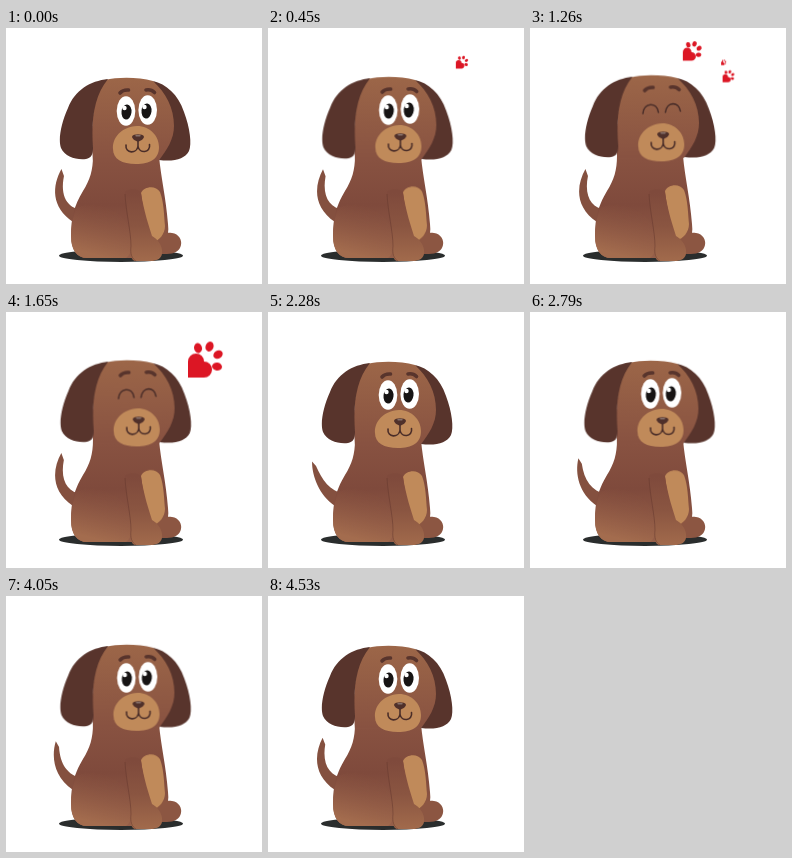
Recreate the animation shown at these times as an HTML page. Size 256 px wide and 256 px high, loop 4560 ms.

```html
<!DOCTYPE html>
<html lang="en">
<head>
<meta charset="utf-8">
<title>Happy dog</title>
<style>
  html, body { margin: 0; width: 100%; height: 100%; overflow: hidden; background: #fff; }
  svg { display: block; width: 100vw; height: 100vh; }

  :root { --loop: 4560ms; --sine: cubic-bezier(.37, 0, .63, 1); }

  .ear { fill: #58342c; }
  .tan { fill: #c08a5a; }
  .line { fill: none; stroke: #4a2d28; stroke-width: 1.6; stroke-linecap: round; }
  .brow { fill: none; stroke: #58342c; stroke-width: 3.6; stroke-linecap: round; }

  /* eleven full wags per loop */
  .tail { animation: wag calc(var(--loop) / 22) var(--sine) -406ms infinite alternate; }
  @keyframes wag {
    from { d: path("M55.5 141 C46 158 45 179 67 194 L76 182 C61 180 54 168 58 148 Z"); }
    to   { d: path("M44 149.5 C44 164 51 183 67 194 L76 182 C62 179 54 168 48 154 Z"); }
  }

  /* two breaths per loop */
  .head, .chest { animation: nod calc(var(--loop) / 4) var(--sine) infinite alternate; }
  .head { transform-origin: 120px 110px; }
  .chest { animation-name: breathe; }
  @keyframes nod { to { transform: translate(1.2px, -2.6px) rotate(-.7deg); } }
  @keyframes breathe { to { transform: translateY(-2px); } }

  .open { animation: open var(--loop) step-end infinite; }
  .shut { opacity: 0; animation: shut var(--loop) step-end infinite; }
  @keyframes open { 0%, 43% { opacity: 1; } 27% { opacity: 0; } }
  @keyframes shut { 0%, 43% { opacity: 0; } 27% { opacity: 1; } }

  .love { fill: #dc1624; transform: scale(0); animation: pop var(--loop) infinite; }
  @keyframes pop {
    0% { transform: scale(0); animation-timing-function: cubic-bezier(.61, 1, .88, 1); }
    11.2% { transform: scale(1); animation-timing-function: cubic-bezier(.12, 0, .39, 0); }
    22.4%, 100% { transform: scale(0); }
  }
</style>
</head>
<body>
<svg viewBox="0 0 256 256">
  <defs>
    <linearGradient id="fur" gradientUnits="userSpaceOnUse" x1="0" y1="50" x2="0" y2="231">
      <stop offset="0" stop-color="#9c6648"/>
      <stop offset=".45" stop-color="#885241"/>
      <stop offset=".7" stop-color="#7f4a3c"/>
      <stop offset="1" stop-color="#96604a"/>
    </linearGradient>
    <linearGradient id="haunch" gradientUnits="userSpaceOnUse" x1="108" y1="172" x2="94" y2="228">
      <stop offset="0" stop-color="#7f4a3c" stop-opacity="0"/>
      <stop offset="1" stop-color="#a36c4e"/>
    </linearGradient>
    <linearGradient id="leg" gradientUnits="userSpaceOnUse" x1="0" y1="165" x2="0" y2="231">
      <stop offset="0" stop-color="#7f4a3c"/>
      <stop offset=".5" stop-color="#8a5541"/>
      <stop offset="1" stop-color="#a0694b"/>
    </linearGradient>
    <g id="paw">
      <path d="M-16 17 V1 A8 8 0 0 1 0 1 A8 8 0 0 1 0 17 Z"/>
      <ellipse cx="-6" cy="-12.5" rx="4" ry="5" transform="rotate(-12 -6 -12.5)"/>
      <ellipse cx="5.5" cy="-14" rx="4" ry="5" transform="rotate(20 5.5 -14)"/>
      <ellipse cx="14" cy="-6" rx="4" ry="5" transform="rotate(55 14 -6)"/>
      <ellipse cx="13" cy="6" rx="4" ry="5" transform="rotate(98 13 6)"/>
    </g>
    <g id="pupil">
      <ellipse rx="5" ry="7.5" fill="#171414" transform="rotate(6)"/>
      <circle cx="-2" cy="-4" r="2.2" fill="#fff"/>
    </g>
  </defs>

  <ellipse cx="115" cy="227.700" rx="62" ry="6.200" fill="#2a2d2d"/>
  <path class="tail" fill="#84503f" d="M55.5 141 C46 158 45 179 67 194 L76 182 C61 180 54 168 58 148 Z"/>

  <path fill="url(#fur)" d="M87 98 V128 C87 142 84 152 77 163 C68 178 65 190 65 208 C65 222 71 230 81 230 H148 C157 222 164 210 162 196 C160 170 155 150 153 128 V98 Z"/>
  <path fill="#8c5642" d="M147 213 C150 206 159 204 166 205 C173 206 176 212 175 217 C174 223 168 226 161 226 H148 Z"/>
  <path class="tan chest" d="M135 165 C138 158 150 157 154 164 C158 174 158 188 159 198 C159 206 153 213 147 214 C141 202 137 182 135 165 Z"/>
  <path fill="url(#haunch)" d="M70 180 C86 172 122 180 124 206 C126 219 126 226 120 230 H81 C71 230 65 222 65 208 C65 198 67 189 70 180 Z"/>
  <path fill="url(#leg)" d="M119 165 C120 160 134 160 135 165 C138 184 143 198 146 208 C153 212 157 219 156 226 C155 231 150 233 145 233 H130 C125 233 124 226 125 219 C125 204 121 188 119 165 Z"/>
  <path fill="none" stroke="#65392f" stroke-opacity=".5" d="M119 166 C120 184 125 204 125 218 C124 226 126 231 130 233"/>

  <g class="head">
    <path fill="url(#fur)" d="M99 52 C112 49 132 49 147 53 C162 61 172 80 170 99 C168 114 160 127 152 133 H87 C85 110 84 70 99 52 Z"/>
    <path class="ear" d="M102 51 C84 53 69 62 62 80 C55 95 52 112 55 120 C59 129 70 132 80 131 C85 130 87 127 87 120 C85 92 88 68 102 51 Z"/>
    <path class="ear" d="M147 53 C160 56 172 66 178 84 C184 100 186 116 183 123 C179 131 168 134 153 132 C161 122 168 111 168 98 C168 80 160 65 147 53 Z"/>
    <path class="tan" d="M107 121 C106 110 115 99 131 98 C144 98 153 108 153 119 C153 131 144 136 130 136 C116 136 107 131 107 121 Z"/>
    <path class="brow" d="M114 65 Q117 61.500 122.500 62 M140 62 Q145 61 148.500 64.500"/>
    <g class="open">
      <ellipse cx="120" cy="83" rx="9.300" ry="14.800" fill="#fff"/>
      <ellipse cx="141.700" cy="82" rx="9.300" ry="14.800" fill="#fff"/>
      <use href="#pupil" x="120.500" y="84"/>
      <use href="#pupil" x="140.500" y="83"/>
    </g>
    <path class="line shut" d="M112 88 C113 77 126 76 127.500 87 M134.500 87 C136 76 148 76 149.500 86"/>
    <path fill="#4f302a" d="M126 108.500 C127 105.500 137 105.500 138 108.500 C138 111 134 113.500 132 113.500 C130 113.500 126 111 126 108.500 Z"/>
    <ellipse cx="132" cy="107.700" rx="2.800" ry=".9" fill="#86706a"/>
    <path class="line" d="M132 113 V118 M120 117 C119 126 131 126 132 118 C133 126 145 125 143.500 116.500"/>
  </g>

  <g transform="translate(193.5 34.5) scale(.79)"><use class="love" href="#paw" style="animation-delay: 300ms"/></g>
  <g transform="translate(161.5 23.5) scale(.58)"><use class="love" href="#paw" style="animation-delay: 630ms"/></g>
  <g transform="translate(198 48.5)"><use class="love" href="#paw" style="animation-delay: 1150ms"/></g>
</svg>
</body>
</html>
```
